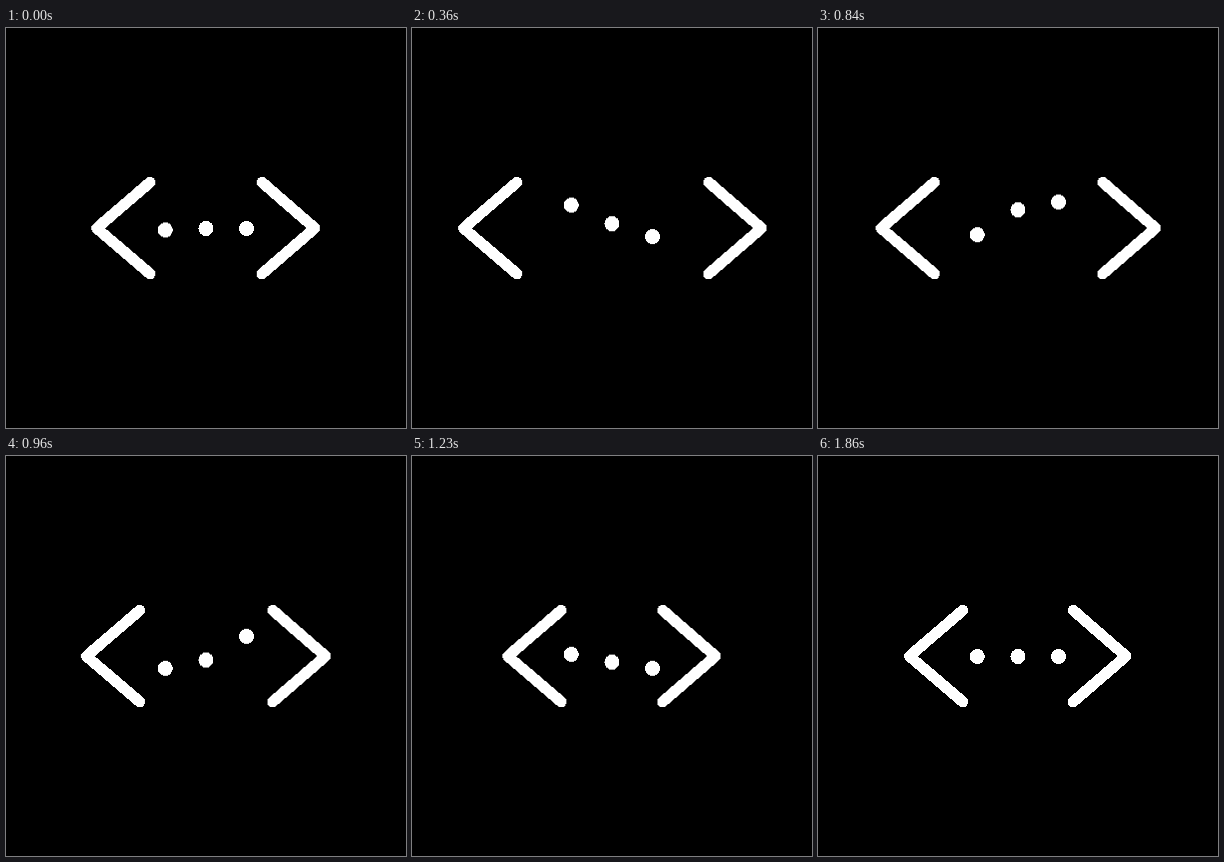
Animation of 400 by 400 pixels, one loop 1890 ms. Source, as an HTML page:

```html
<!DOCTYPE html>
<html lang="en">
<head>
<meta charset="utf-8">
<title>Bouncing dots between brackets</title>
<style>
  :root {
    --loop: 1890ms;
    --soft: cubic-bezier(.33, 0, .67, 1);
  }
  html, body { margin: 0; width: 100%; height: 100%; overflow: hidden; background: #000; }
  svg { display: block; width: 100%; height: 100%; shape-rendering: crispEdges; }
  path {
    fill: none; stroke: #fff; stroke-width: 11; stroke-linecap: round; stroke-linejoin: round;
    animation: spread var(--loop) -30ms infinite var(--soft);
  }
  .left { --reach: -1; }
  .right { --reach: 1.04; }

  /* Each dot follows the one before it by 135ms; negative delays start mid-loop. */
  circle {
    fill: #fff;
    animation: bounce var(--loop) infinite var(--soft);
    animation-delay: calc(-30ms + var(--i) * 135ms - var(--loop));
  }

  @keyframes spread {
    0% { transform: translateX(0); animation-timing-function: cubic-bezier(.26, 0, .33, 1); }
    28% { transform: translateX(calc(var(--reach) * 42.4px)); animation-timing-function: cubic-bezier(.69, 0, .57, 1); }
    64.5% { transform: translateX(calc(var(--reach) * -4.5px)); }
    86.8%, 100% { transform: translateX(0); }
  }
  @keyframes bounce {
    0% { transform: translateY(0); }
    6.1% { transform: translateY(8.1px); animation-timing-function: cubic-bezier(.33, 0, .61, 1); }
    25.4% { transform: translateY(-27.9px); animation-timing-function: cubic-bezier(.84, 0, .6, 1); }
    51.3% { transform: translateY(12px); }
    70.1% { transform: translateY(-3.5px); animation-timing-function: cubic-bezier(.33, 0, .5, 1); }
    86.2%, 100% { transform: translateY(0); }
  }
</style>
</head>
<body>
<svg viewBox="0 0 400 400">
  <path class="left" d="M144.8 154.3 91.5 200.2 144.8 245.8"/>
  <path class="right" d="M255.2 154.3 308 200.2 255.2 245.8"/>
  <circle style="--i: 0" cx="159.3" cy="200.5" r="7.5"/>
  <circle style="--i: 1" cx="200" cy="200.5" r="7.5"/>
  <circle style="--i: 2" cx="240.6" cy="200.5" r="7.5"/>
</svg>
</body>
</html>
```
